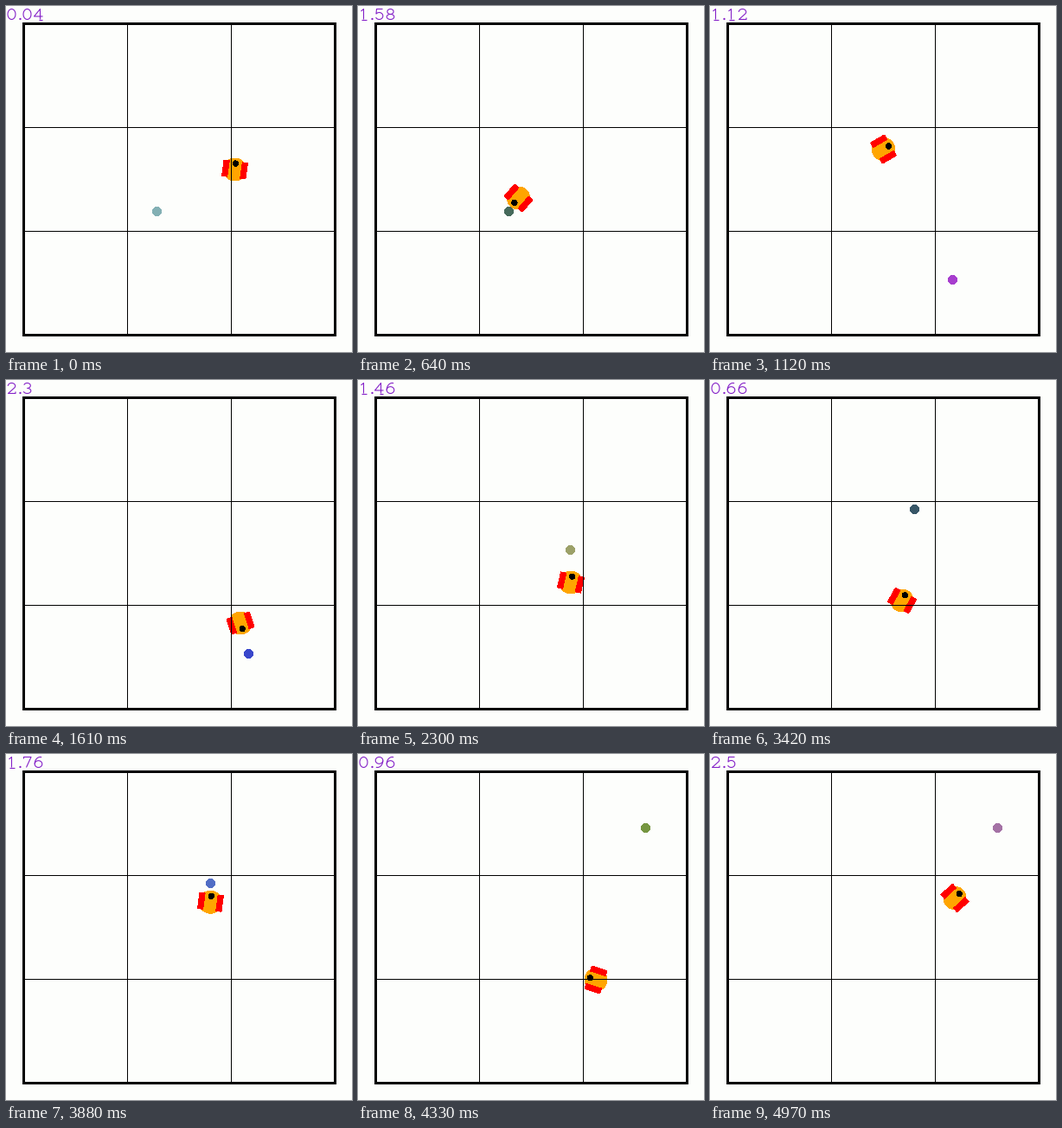
A matplotlib script that plays this animation: 400 px wide and 400 px high, repeating every 5 s.

```python
import numpy as np
import matplotlib.pyplot as plt
from matplotlib.animation import FuncAnimation
from matplotlib.collections import LineCollection
from matplotlib.patches import Circle, Polygon, Rectangle

LOOP_MS, INTERVAL = 5000, 20
TICKS = 165            # poses per loop
TICK_MS = LOOP_MS / TICKS
STEP = 0.02            # clock seconds per simulation step
STEPS_PER_TICK = 11 / 3
SPEED = 7              # pixels per tick at a waypoint
PX = 0.72              # points per pixel at 100 dpi
LINE = "#8420c8"

# Waypoints: tick, x, y, heading in degrees clockwise from up
WAY = np.array([
    (0, 264, 188.5, 8), (21, 185, 221.5, -139), (37, 200, 165, 60),
    (53, 270.5, 280.5, 162), (76, 245.5, 233.5, 13), (91, 300, 200, 180),
    (104, 262, 280, 235), (113, 221.5, 254.5, 29), (129, 237, 164, 10),
    (143, 274.5, 260.5, -72), (164, 282.5, 166, 47)])

# Step at which each goal appears, and its place
GOALS = [(0, 174, 237), (81, 280, 316), (207, 245, 196),
         (298, 268, 285), (383, 236, 149), (478, 332, 85)]

# The goal flickers through random colours
goal_colors = np.random.default_rng(7).uniform(
    (0.2, 0.15, 0.2), (0.7, 0.75, 0.85), (TICKS, 3))


def direction(degrees):
    a = np.radians(degrees)
    return np.array([np.sin(a), -np.cos(a)])


def pose(tick):
    """Position and unit heading on a Hermite curve through the waypoints."""
    k = np.clip(np.searchsorted(WAY[:, 0], tick, "right") - 1, 0, len(WAY) - 2)
    (t0, *p0, a0), (t1, *p1, a1) = WAY[k], WAY[k + 1]
    reach = SPEED * (t1 - t0) / 3
    b0, b3 = np.array(p0), np.array(p1)
    b1, b2 = b0 + reach * direction(a0), b3 - reach * direction(a1)
    u = (tick - t0) / (t1 - t0)
    v = 1 - u
    pos = v**3 * b0 + 3 * v * v * u * b1 + 3 * v * u * u * b2 + u**3 * b3
    vel = v * v * (b1 - b0) + 2 * v * u * (b2 - b1) + u * u * (b3 - b2)
    return pos, vel / np.hypot(*vel)


def arc(cx, cy, rx, ry, a0=0, a1=360):
    a = np.radians(np.linspace(a0, a1, 25))
    return np.column_stack([cx + rx * np.cos(a), cy + ry * np.sin(a)])


def line(*pts):
    return np.array(pts, float)


# Single-stroke digits in a 10 by 12 box
six = [arc(5, 8.1, 4.3, 3.9), arc(7, 8, 6.3, 8, 180, 285)]
GLYPHS = {
    "0": [arc(5, 6, 4.5, 6)],
    "1": [line((2, 2.5), (5, 0), (5, 12)), line((2, 12), (8, 12))],
    "2": [np.vstack([arc(5, 3.4, 4.2, 3.4, 180, 395),
                     line((1, 12), (9.5, 12), (9.5, 10))])],
    "3": [arc(5, 3, 3.8, 3, 195, 450), arc(5, 9, 4.3, 3, -90, 165)],
    "4": [line((7, 12), (7, 0), (0, 8.5), (10, 8.5)), line((5, 12), (9, 12))],
    "5": [np.vstack([line((9, 0), (2, 0), (1.5, 5.5)),
                     arc(5, 8, 4.3, 4, -140, 155)])],
    "6": six,
    "7": [line((1, 2), (1, 0), (9.5, 0), (4, 12))],
    "8": [arc(5, 3, 3.6, 3), arc(5, 9, 4.3, 3)],
    "9": [(10, 12) - s for s in six],
    ".": [arc(2, 11.5, 0.6, 0.6)],
}


def text_strokes(text, x=1, y=3):
    strokes = []
    for ch in text:
        strokes += [s + (x, y) for s in GLYPHS[ch]]
        x += 5 if ch == "." else 13
    return strokes


fig = plt.figure(figsize=(4, 4), dpi=100, facecolor="#fdfefc")
ax = fig.add_axes([0, 0, 1, 1])
ax.set(xlim=(-0.5, 399.5), ylim=(399.5, -0.5))
ax.axis("off")


def disc(radius, color, z):
    return ax.add_patch(Circle((0, 0), radius, fc=color, lw=0, aa=False,
                               snap=False, zorder=z))


goal = disc(4.9, "gray", 1)
body = disc(13, "#ffa500", 2)
wheels = [ax.add_patch(Polygon(np.zeros((4, 2)), fc="red", lw=0, aa=False,
                               snap=False, zorder=3)) for _ in range(2)]
nose = disc(3.1, "black", 4)

# Half-pixel offsets make the lines snap to whole pixels
for p in (139.5, 259.5):
    ax.plot([p, p], [19.5, 379.5], "k", lw=PX, aa=False, zorder=5)
    ax.plot([19.5, 379.5], [p, p], "k", lw=PX, aa=False, zorder=5)
ax.add_patch(Rectangle((19.5, 19.5), 360, 360, fill=False, ec="k", lw=3 * PX,
                       aa=False, zorder=5, joinstyle="round"))
clock = ax.add_collection(LineCollection([], colors=LINE, lw=1.1 * PX,
                                         zorder=6))


def draw(i):
    tick = min(round(i * INTERVAL / TICK_MS), TICKS - 1)
    pos, ahead = pose(tick)
    side = np.array([-ahead[1], ahead[0]])

    body.center = tuple(pos)
    nose.center = tuple(pos + 7 * ahead)
    for wheel, s in zip(wheels, (-1, 1)):
        mid = pos + s * 10.7 * side
        wheel.set_xy([mid + u * 3.1 * side + v * 9.2 * ahead
                      for u, v in ((-1, -1), (1, -1), (1, 1), (-1, 1))])

    step = int(2 + tick * STEPS_PER_TICK + 1e-6)
    start, *place = [g for g in GOALS if g[0] <= step][-1]
    goal.center = tuple(place)
    goal.set_facecolor(goal_colors[tick])
    clock.set_segments(text_strokes(str(round((step - start) * STEP, 2))))
    return body, nose, *wheels, goal, clock


anim = FuncAnimation(fig, draw, frames=LOOP_MS // INTERVAL, interval=INTERVAL,
                     repeat=True, repeat_delay=0)
plt.show()
```
